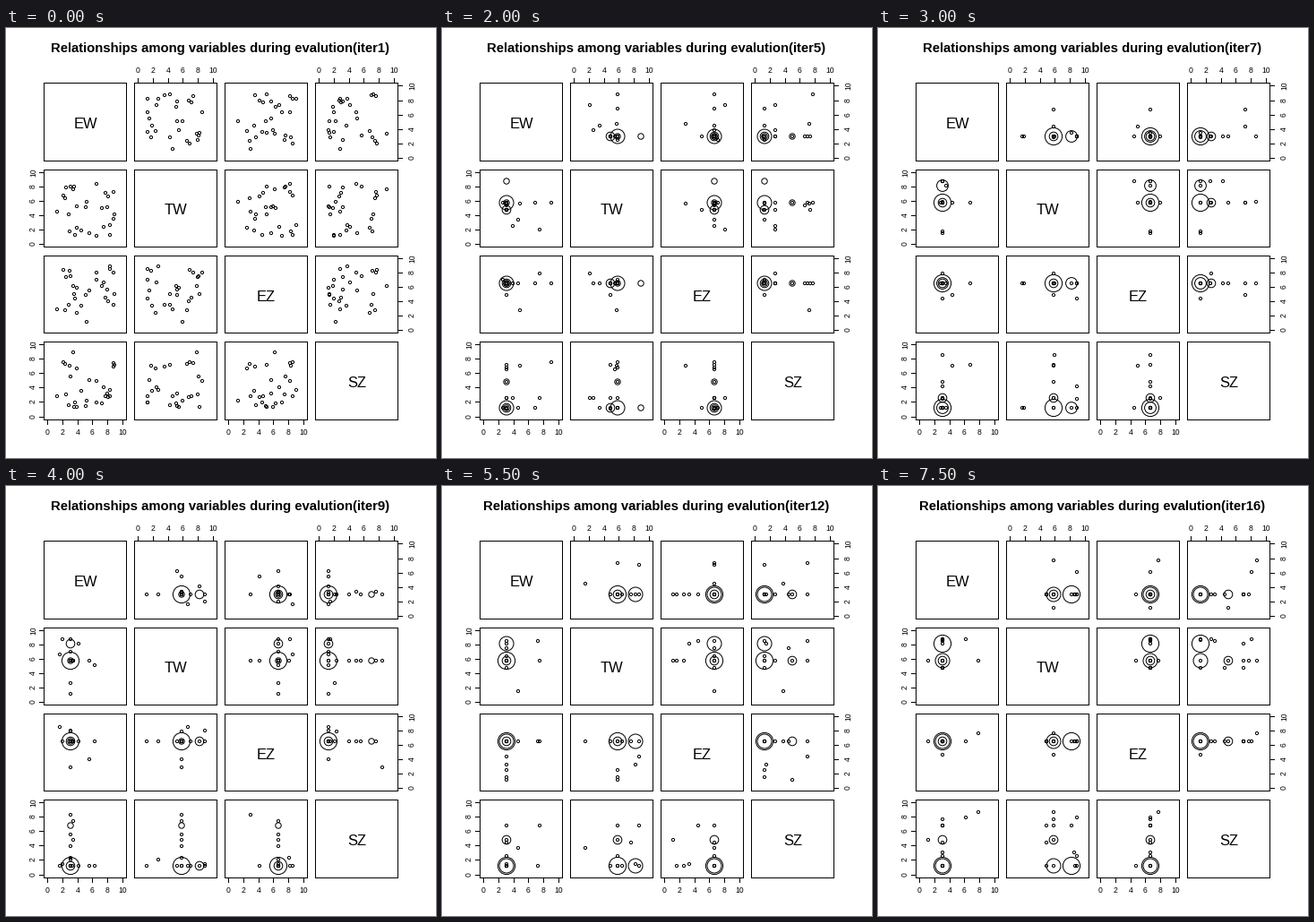
Recreate the animation shown at these times as a matplotlib script. Size 480 px wide and 480 px high, loop 8000 ms.

```python
import math
import random
from collections import Counter

import matplotlib.pyplot as plt
from matplotlib.animation import FuncAnimation
from matplotlib.collections import LineCollection, PathCollection
from matplotlib.path import Path

SIZE, DPI = 480, 96
PX = 72 / DPI
LINE = 9.504                       # one margin line in pixels
CELL_W, CELL_H = 100.992, 96.24
PLOT_W, PLOT_H = CELL_W - LINE, CELL_H - LINE
GENERATIONS, POP = 16, 28

NAMES = ["EW", "TW", "EZ", "SZ"]
BEST = [3.05, 5.75, 6.55, 1.3]
RATES = [0.2, 0.5, 0.2, 0.5]       # lasting mutation rate of each trait
LIKED = {1: (8.8, 8.1, 4.8), 3: (2.65, 4.9, 6.9)}


def variant(trait, value):
    ind = BEST.copy()
    ind[trait] = value
    return tuple(ind)


def mutant(n, rng):
    """A child of the best; early generations are almost fully random."""
    ind = BEST.copy()
    for k, rate in enumerate(RATES):
        if rng.random() < max(rate, 1.2 - 0.2 * n):
            if n > 2 and k in LIKED and rng.random() < 0.5:
                ind[k] = rng.choice(LIKED[k])
            else:
                ind[k] = rng.uniform(1.1, 9)
    return tuple(ind)


def generation(n):
    """Count the copies of each individual in generation n."""
    rng = random.Random(n)
    grow = min(n - 1, 4)
    pop = [tuple(BEST)] * grow
    pop += [variant(1, rng.choice(LIKED[1]))] * (grow - 1)
    pop += [variant(3, rng.choice(LIKED[3]))] * (grow - 2)
    pop += [mutant(n, rng) for _ in range(POP - len(pop))]
    return Counter(pop)


def left(col):
    return 4.5 * LINE + col * CELL_W


def bottom(row):
    return 6.5 * LINE + row * CELL_H + PLOT_H


def xpos(col, v):
    return left(col) + (v + 0.4) / 10.8 * PLOT_W


def ypos(row, v):
    return bottom(row) - (v + 0.4) / 10.8 * PLOT_H


def circles(counts):
    """Rings for all panels, with a radius that grows with the copies."""
    return [Path.circle((round(xpos(col, ind[col])), round(ypos(row, ind[row]))),
                        1.6 * min(copies, 6))
            for row in range(4) for col in range(4) if row != col
            for ind, copies in counts.items()]


fig = plt.figure(figsize=(SIZE / DPI, SIZE / DPI), dpi=DPI, facecolor="white")
ax = fig.add_axes([0, 0, 1, 1])
ax.set_xlim(0, SIZE)
ax.set_ylim(SIZE, 0)
ax.axis("off")


def label(x, y, text, size, **kw):
    return ax.text(x, y, text, fontsize=size * PX, family="Liberation Sans",
                   ha="center", va="baseline", rotation_mode="anchor", **kw)


# Whole coordinates are snapped to pixel centres when drawn.
lines = []
for row in range(4):
    for col in range(4):
        x0, x1 = math.floor(left(col)), math.floor(left(col) + PLOT_W)
        y0, y1 = math.floor(bottom(row) - PLOT_H), math.floor(bottom(row))
        lines.append([(x0, y0), (x1, y0), (x1, y1), (x0, y1), (x0, y0)])
    label(left(row) + PLOT_W / 2, bottom(row) - PLOT_H / 2 + 7, NAMES[row], 16.5)

x_lo, x_hi = math.floor(left(0)), math.floor(left(3) + PLOT_W)
y_lo, y_hi = math.floor(bottom(0) - PLOT_H), math.floor(bottom(3))
for i in range(4):
    for v in range(0, 11, 2):
        x, y = math.floor(xpos(i, v)), math.floor(ypos(i, v))
        if i % 2:
            x_edge, y_edge, out = x_lo, y_lo, -5
            x_text, y_text = 33, 50.5
        else:
            x_edge, y_edge, out = x_hi, y_hi, 5
            x_text, y_text = 456, 454.5
        lines.append([(x, y_edge), (x, y_edge + out)])
        lines.append([(x_edge, y), (x_edge + out, y)])
        label(x, y_text, str(v), 8.6)
        label(x_text, y, str(v), 8.6, rotation=90)

ax.add_collection(LineCollection(lines, colors="black", linewidths=PX,
                                 antialiaseds=False, capstyle="projecting"),
                  autolim=False)
title = label(239, 27, "", 14.9, weight="bold")
marks = PathCollection(circles(generation(1)), facecolors="none",
                       edgecolors="black", linewidths=PX)
ax.add_collection(marks, autolim=False)


def update(i):
    n = i + 1
    title.set_text(f"Relationships among variables during evalution(iter{n})")
    marks.set_paths(circles(generation(n)))
    return title, marks


anim = FuncAnimation(fig, update, frames=GENERATIONS, interval=500, repeat=True,
                     repeat_delay=0, blit=False)
plt.show()
```
